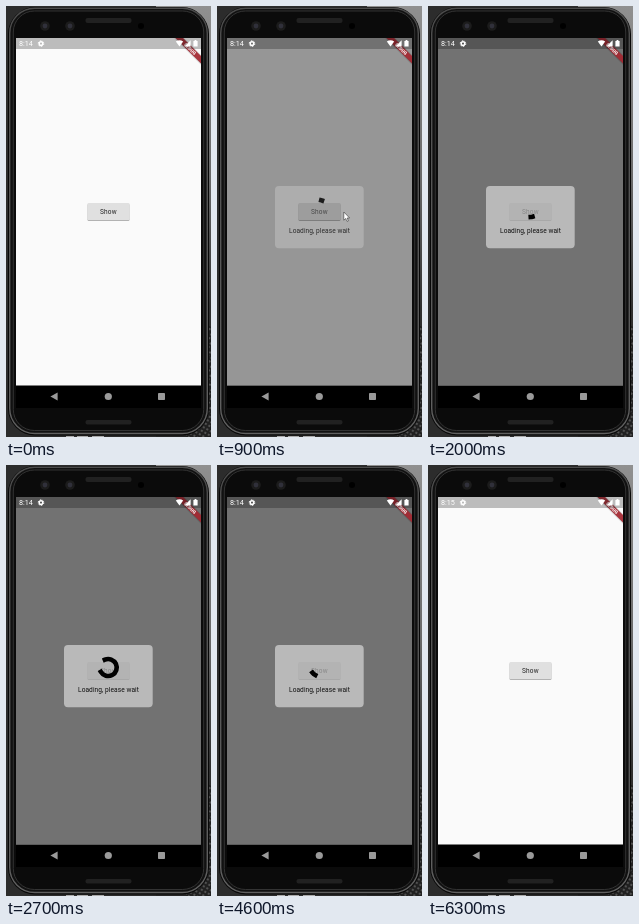
An HTML page that plays this animation: 205 px wide and 431 px high, repeating every 7000 ms.

```html
<!DOCTYPE html>
<html lang="en">
<head>
<meta charset="utf-8">
<title>Loading dialog</title>
<style>
  html, body { margin: 0; width: 100%; height: 100%; overflow: hidden; background: #222; }
  svg { display: block; width: 205px; height: 431px; }
  text { font-family: Roboto, "Open Sans", sans-serif; font-weight: 400; }
</style>
</head>
<body>
<svg viewBox="0 0 205 431">
  <defs>
    <linearGradient id="wall" x1="0" y1="0" x2="0" y2="1">
      <stop offset="0" stop-color="#909090"/>
      <stop offset=".1" stop-color="#868686"/>
      <stop offset=".4" stop-color="#6a6a6a"/>
      <stop offset=".7" stop-color="#303030"/>
      <stop offset="1" stop-color="#262626"/>
    </linearGradient>
    <linearGradient id="rim" x1="0" y1="0" x2="0" y2="1">
      <stop offset="0" stop-color="#4c4c4c"/>
      <stop offset=".5" stop-color="#565656"/>
      <stop offset="1" stop-color="#606060"/>
    </linearGradient>
    <pattern id="mesh" width="4" height="4" patternUnits="userSpaceOnUse" patternTransform="rotate(30)">
      <rect width="4" height="4" fill="#202020"/>
      <circle cx="2" cy="2" r="1.1" fill="#5c5c5c"/>
    </pattern>
    <clipPath id="view"><rect x="10" y="32" width="185" height="347.4"/></clipPath>
    <filter id="soft" x="-20%" y="-40%" width="140%" height="190%"><feGaussianBlur stdDeviation=".7"/></filter>
  </defs>

  <!-- surroundings and phone body -->
  <rect width="205" height="431" fill="#2c2c2c"/>
  <rect x="150" width="55" height="431" fill="url(#wall)"/>
  <rect x="180" y="320" width="25" height="111" fill="url(#mesh)"/>
  <path d="M60 430.5h8M71 430.5h11M86 430.5h12" stroke="#aaa"/>
  <rect x="2" y="1" width="201" height="428.5" rx="27" fill="#080808"/>
  <rect x="3.7" y="2.2" width="197.6" height="425.3" rx="25" fill="#111" stroke="url(#rim)" stroke-width="1.4"/>
  <rect x="7.3" y="5" width="190.4" height="419.5" rx="21" fill="#0b0b0b" stroke="#333"/>
  <g fill="#212121">
    <rect x="79.5" y="12" width="46" height="5" rx="2"/>
    <rect x="79.5" y="414" width="46" height="4.5" rx="2"/>
  </g>
  <g fill="#1c1c1c">
    <circle cx="39" cy="20" r="4.8"/>
    <circle cx="64" cy="20" r="4.8"/>
    <circle cx="135" cy="20" r="3" fill="#000"/>
  </g>
  <g fill="#30303a">
    <circle cx="39" cy="20" r="2.4"/>
    <circle cx="64" cy="20" r="2.4"/>
  </g>

  <!-- navigation bar -->
  <rect x="10" y="379" width="185" height="23" fill="#000"/>
  <g fill="#9a9a9a">
    <path d="M44.4 390.5l7.2-4v8z"/>
    <circle cx="102.3" cy="390.5" r="3.6"/>
    <rect x="152" y="387" width="7" height="7" rx=".8"/>
  </g>

  <!-- app -->
  <g clip-path="url(#view)">
    <rect x="10" y="32" width="185" height="348" fill="#fafafa"/>
    <rect id="shadow" x="81.5" y="198" width="42" height="17" rx="1.5" opacity=".35" filter="url(#soft)"/>
    <rect id="button" x="81.2" y="197" width="42.6" height="17.3" rx="1.5" fill="#e0e0e0"/>
    <text x="102.4" y="208" font-size="6.5" letter-spacing=".2" text-anchor="middle" fill="#222">Show</text>

    <rect id="barrier" x="10" y="32" width="185" height="348" opacity="0"/>
    <g id="dialog" opacity="0">
      <rect id="card" x="58" y="180" width="88.7" height="62.2" rx="4" fill="#fff" fill-opacity=".5"/>
      <path id="arc" fill="none" stroke="#000" stroke-width="4.6" stroke-linecap="square"/>
      <text x="102.5" y="226.8" font-size="6.6" letter-spacing=".06" text-anchor="middle" fill="#111">Loading, please wait</text>
    </g>

    <g transform="translate(195 32) rotate(45)">
      <rect x="-19" y="12.7" width="38" height="5.6" opacity=".4" filter="url(#soft)"/>
      <rect x="-19" y="12.7" width="38" height="5.4" fill="#ac2a34" fill-opacity=".88"/>
      <text x="0" y="17.1" font-size="4.6" style="font-weight:900" text-anchor="middle" fill="#fff">DEBUG</text>
    </g>

    <rect x="10" y="32" width="185" height="11" fill-opacity=".25"/>
    <text id="clock" x="13" y="40.2" font-size="7.2" fill="#fff">8:14</text>
    <circle cx="35" cy="37.6" r="1.8" fill="none" stroke="#fff" stroke-width="1.5"/>
    <circle cx="35" cy="37.6" r="2.8" fill="none" stroke="#fff" stroke-width="1" stroke-dasharray="1.466"/>
    <g fill="#fff">
      <path d="M169.8 35.6Q173.5 32.8 177.2 35.6L173.5 40.4z"/>
      <path d="M184.6 34.2v6.2h-6.2z"/>
      <path d="M187.4 35h1.2v-.9h1.8v.9h1.2v5.6h-4.2z"/>
    </g>
  </g>

  <path id="cursor" d="M0 0v8.2l1.9-1.7 1.3 2.9 1.4-.6-1.3-2.8h2.5z" fill="#fff" stroke="#333" stroke-width=".6" visibility="hidden"/>
</svg>
<script>
const LOOP = 7000, STEP = 100, SPIN_START = 840, CYCLE = 1333;
const CX = 102.2, CY = 202.5, R = 8.5;
const el = id => document.getElementById(id);
const set = (id, name, value) => el(id).setAttribute(name, value);

// each row: time, value; held until the next row
const barrierSteps = [[0, 0], [900, .4], [1000, .54], [5900, .52], [6000, .2], [6100, 0]];
const cardSteps = [[0, 0], [900, .28], [1000, .5], [5900, .48], [6000, .2]];
const dialogSteps = [[0, 0], [900, .8], [1000, 1], [5900, .97], [6000, .4], [6100, 0]];
const clockSteps = [[0, "8:14"], [5700, "8:15"]];
const cursorSteps = [[0, null], [300, [112.3, 205.3]], [900, [126.8, 206]], [1000, null]];

function at(steps, t) {
  let value;
  for (const [time, v] of steps) if (t >= time) value = v;
  return value;
}

// cubic-bezier(.4, 0, .2, 1)
function ease(x) {
  if (x <= 0) return 0;
  if (x >= 1) return 1;
  let lo = 0, hi = 1, u;
  for (let i = 0; i < 24; i++) {
    u = (lo + hi) / 2;
    const bx = 1.2 * u * (1 - u) ** 2 + .6 * u * u * (1 - u) + u ** 3;
    if (bx < x) lo = u; else hi = u;
  }
  return 3 * u * u - 2 * u ** 3;
}

function arcPath(t) {
  const turns = Math.max(0, t - SPIN_START) / CYCLE;
  const n = Math.floor(turns), p = turns - n;
  const head = ease(p * 2), tail = ease(p * 2 - 1);
  const start = -90 + 270 * (n + tail) + 306 * turns;
  const sweep = Math.max(270 * (head - tail), .5);
  const point = deg => {
    const a = deg * Math.PI / 180;
    return `${(CX + R * Math.cos(a)).toFixed(3)} ${(CY + R * Math.sin(a)).toFixed(3)}`;
  };
  return `M${point(start)}A${R} ${R} 0 ${sweep > 180 ? 1 : 0} 1 ${point(start + sweep)}`;
}

function draw(t) {
  set("barrier", "opacity", at(barrierSteps, t));
  set("card", "fill-opacity", at(cardSteps, t));
  set("dialog", "opacity", at(dialogSteps, t));
  set("arc", "d", arcPath(t));
  el("clock").textContent = at(clockSteps, t);
  const pressed = t >= 800 && t < 1000;
  set("button", "fill", pressed ? "#d6d6d6" : "#e0e0e0");
  set("shadow", "opacity", pressed ? .5 : .35);
  const pos = at(cursorSteps, t);
  set("cursor", "visibility", pos ? "visible" : "hidden");
  if (pos) set("cursor", "transform", `translate(${pos})`);
}

const begin = performance.now();
function tick() {
  const t = (performance.now() - begin) % LOOP;
  draw(Math.floor(t / STEP) * STEP);
  requestAnimationFrame(tick);
}
draw(0);
requestAnimationFrame(tick);
</script>
</body>
</html>
```
